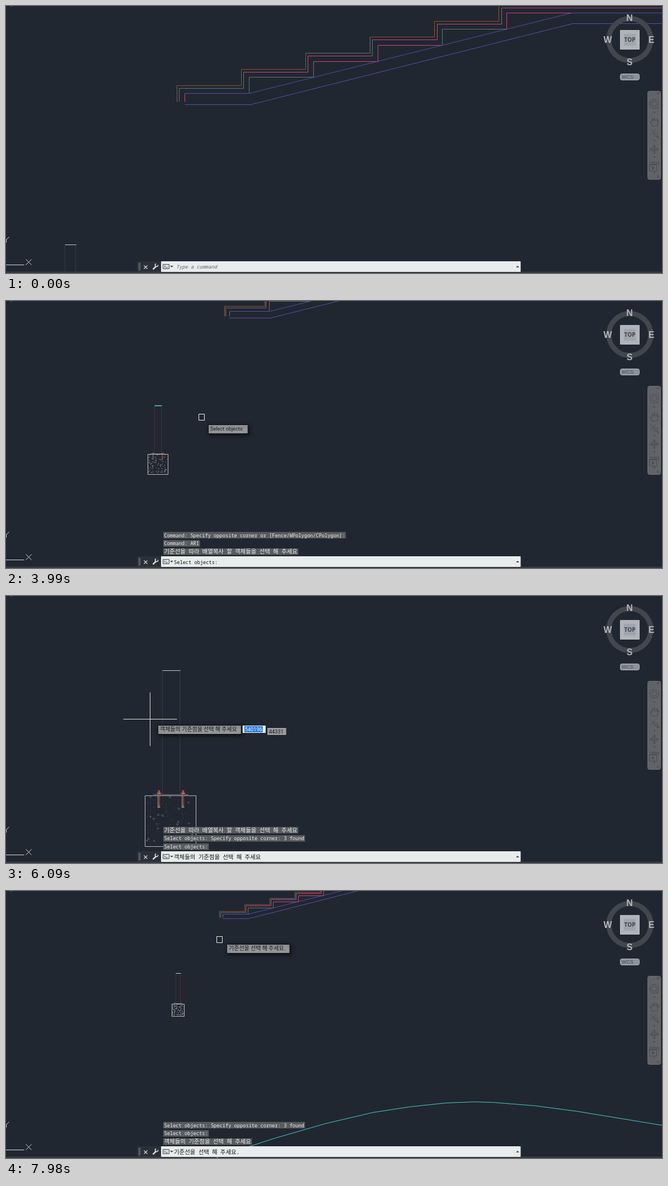
An HTML page with a canvas that plays this animation: 1172x478 px, repeating every 8 s.

```html
<!DOCTYPE html>
<html lang="en">
<head>
<meta charset="utf-8">
<title>CAD array along a line</title>
<style>
html, body { margin: 0; width: 100%; height: 100%; overflow: hidden; background: #212730; }
canvas { display: block; }
</style>
</head>
<body>
<canvas id="stage" width="1172" height="478"></canvas>
<script>
const ctx = document.getElementById('stage').getContext('2d');
const LOOP = 8000, STEP = 70, BG = '#212730';
const MONO = '8.7px "Noto Sans Mono", monospace';
const MONO_KO = '10.45px "Noto Sans Mono CJK KR", "Noto Sans CJK KR", monospace';
const UI = '9.2px Roboto, sans-serif';
const UI_KO = '10px "Noto Sans CJK KR", "Noto Sans CJK", sans-serif';

// Pointer path: time, x, y
const POINTER = [
  [420, 430, 352], [490, 430, 352], [770, 380, 397], [1120, 380, 397], [1260, 565, 145],
  [1330, 569, 139], [1400, 569, 139], [1820, 351, 188], [3920, 351, 188], [3990, 349, 208],
  [4130, 335, 328], [4270, 335, 328], [5040, 203, 235], [5110, 203, 235], [5320, 238, 238],
  [5530, 238, 238], [5600, 244, 241], [5740, 256, 222], [6370, 258, 220], [6580, 272, 177],
  [6930, 295, 133], [7280, 295, 133], [7420, 311, 152], [7560, 311, 152], [7980, 381, 87]
];
// Wheel zooms: time, factor, centre x, centre y
const IN = 1.6, OUT = 1 / 1.6;
const ZOOMS = [
  [1050, IN, 376.6, 398.5], [2030, OUT, 351, 188], [2170, OUT, 351, 188],
  [5880, IN, 256, 221.9], [6020, IN, 256, 221.9],
  [7420, OUT, 311.3, 152], [7490, OUT, 311.3, 152], [7560, OUT, 311.3, 152]
];
const PAN_START = 1120, PAN_END = 1400;

const PICK_BASE = '객체들의 기준점을 선택 해 주세요';
const PICK_LINE = '기준선을 선택 해 주세요.';
const HISTORY = [
  'Command: Specify opposite corner or [Fence/WPolygon/CPolygon]:',
  'Command: AR1',
  '기준선을 따라 배열복사 할 객체들을 선택 해 주세요',
  'Select objects: Specify opposite corner: 3 found',
  'Select objects:',
  PICK_BASE
];

const within = (t, a, b) => t >= a && t < b;
const isKorean = s => /[가-힣]/.test(s);

function pointerAt(t) {
  let i = POINTER.findIndex(k => k[0] > t);
  if (i < 0) return POINTER[POINTER.length - 1].slice(1);
  if (!i) return POINTER[0].slice(1);
  const [t0, x0, y0] = POINTER[i - 1], [t1, x1, y1] = POINTER[i];
  const p = (t - t0) / (t1 - t0);
  return [x0 + (x1 - x0) * p, y0 + (y1 - y0) * p];
}

function panAt(t) {
  if (t < PAN_START) return [0, 0];
  const [x, y] = pointerAt(Math.min(t, PAN_END)), [x0, y0] = pointerAt(PAN_START);
  return [x - x0, y - y0];
}

function viewAt(t) {
  let s = 1, x = 0, y = 0;
  ZOOMS.forEach(([when, f, cx, cy], i) => {
    if (when <= t) {
      s *= f;
      x = cx + (x - cx) * f;
      y = cy + (y - cy) * f;
    }
    if (!i) { const [dx, dy] = panAt(t); x += dx; y += dy; }
  });
  return { s, x, y };
}

function line(points, color, width = 1) {
  ctx.beginPath();
  points.forEach(([x, y]) => ctx.lineTo(Math.floor(x) + .5, Math.floor(y) + .5));
  ctx.strokeStyle = color;
  ctx.lineWidth = width;
  ctx.stroke();
}
function box(x, y, w, h, fill, stroke, r = 0) {
  ctx.beginPath();
  ctx.roundRect(x, y, w, h, r);
  if (fill) { ctx.fillStyle = fill; ctx.fill(); }
  if (stroke) { ctx.strokeStyle = stroke; ctx.lineWidth = 1; ctx.stroke(); }
}
function ring(x, y, r, color, width = 1) {
  ctx.beginPath();
  ctx.arc(x, y, r, 0, 7);
  ctx.strokeStyle = color;
  ctx.lineWidth = width;
  ctx.stroke();
}
function text(s, x, y, font, color, align = 'left') {
  ctx.font = font;
  ctx.fillStyle = color;
  ctx.textAlign = align;
  ctx.fillText(s, x, y);
}
const mono = s => isKorean(s) ? MONO_KO : MONO;

function drawStairs(P) {
  const GREY = '#5f7672', PINK = '#d13f83', BLUE = '#554fb0', RUST = '#94502c';
  const DX = 115.1, DY = 28.75;
  const flight = (x, y, steps, colors, risers) => {
    line([P(x, 171), P(x, y)], risers[0]);
    for (let i = 0; i < steps; i++) {
      const x0 = x + i * DX, y0 = y - i * DY;
      line([P(x0, y0), P(x0 + DX, y0)], colors[i]);
      line([P(x0 + DX, y0), P(x0 + DX, y0 - DY)], risers[i + 1] || risers[1]);
    }
  };
  const diagonal = '#504caa';
  line([P(434.5, 156.6), P(1010, 12.6), P(1500, 12.6)], diagonal);
  line([P(319.3, 176.3), P(437, 176.3), P(1012, 31.6), P(1500, 31.6)], BLUE);
  flight(305, 142, 5, [RUST, RUST, GREY, RUST, RUST], ['#8a5a45', RUST, RUST, GREY, RUST, RUST]);
  flight(309.6, 147, 5, [GREY, PINK, PINK, PINK, PINK], [GREY, PINK, PINK, GREY, PINK, PINK]);
  line([P(885.1, 3.3), P(1500, 3.3)], PINK);
  flight(319.3, 156.6, 5, [BLUE, GREY, PINK, PINK, GREY], [PINK, GREY, PINK, PINK, GREY, PINK]);
  line([P(894.8, 12.6), P(1010, 12.6)], PINK);
}

function drawCurve(P) {
  const points = [[360, 484], [437, 457], [480, 443], [570, 417], [655, 397], [720, 387], [785, 380],
    [835, 378], [870, 379], [945, 385], [1020, 395], [1172, 420], [1250, 433]];
  line(points.map(([x, y]) => P((x - 262.3) * 2.56, (y + 19.2) * 2.56)), '#45cfd0');
}

function drawBolt(P, s, x, red) {
  const color = red ? '#c8402f' : '#676d73';
  const part = (dx, y, w, h, fill) => {
    const [px, py] = P(x + dx, y);
    ctx.fillStyle = fill;
    ctx.fillRect(px, py, Math.max(1, w * s), Math.max(1, h * s));
  };
  part(-1.2, 561, 2.4, 3, color);
  part(-2.2, 564, 4.4, 1, '#92979b');
  part(-1.5, 566, .6, 15, '#8b9095');
  part(-.6, 565, 1.6, 15, color);
  part(-.1, 568, .5, 9, '#373d45');
  part(-1.3, 579.5, 2.6, 1, '#92979b');
}

function drawPost(P, s, t) {
  const lit = within(t, 4690, 5670);
  const [bx, by] = P(86, 567), w = 57 * s;
  const [px, py] = P(105, 427), right = P(124.5, 427)[0], foot = P(105, 567)[1];
  const cyanTop = within(t, 1050, 5670);
  const coloured = cyanTop || t >= 7490;
  let seed = 7;
  const rnd = () => (seed = seed * 16807 % 2147483647) / 2147483647;

  if (lit) {
    for (const x of [px, right]) {
      line([[x, py], [x, foot]], '#3153a8', 3);
      line([[x, py], [x, foot]], '#6079c9');
    }
    line([[px - 4, foot - 1], [right + 5, foot - 1]], '#2f77d8', 3);
  } else {
    line([[px, py], [px, foot]], coloured ? '#512840' : '#343a43');
    line([[right, py], [right, foot]], coloured && s < 1 ? '#512840' : '#343a43');
  }
  line([[px, py], [right + 1, py]], cyanTop ? '#40dce0' : '#c9cccf', s < 1 && cyanTop ? 1.5 : 1);

  // Concrete: stones and sand grains
  for (let i = 0; i < 100; i++) {
    const x = bx + (.03 + rnd() * .93) * w, y = by + (.03 + rnd() * .93) * w;
    const stone = i % 4 === 0, r = stone ? Math.max(.7, s * (.7 + rnd() * .8)) : .5;
    const a = rnd() * 6.3;
    if (lit) {
      ctx.fillStyle = '#2b72d6';
      ctx.beginPath();
      ctx.arc(x, y, 2.1, 0, 7);
      ctx.fill();
    } else if (stone) {
      ctx.beginPath();
      for (let k = 0; k < 3; k++) ctx.lineTo(x + r * Math.cos(a + k * 2.1), y + r * Math.sin(a + k * 2.1));
      ctx.closePath();
      ctx.strokeStyle = s < 1 ? '#92979b' : '#747a80';
      ctx.lineWidth = .6;
      ctx.stroke();
    } else {
      ctx.fillStyle = s < 1 ? '#7f858a' : '#4b5158';
      ctx.fillRect(Math.floor(x), Math.floor(y), 1, 1);
    }
  }
  const corner = [Math.floor(bx) + .5, Math.floor(by) + .5, Math.round(w), Math.round(w)];
  if (lit) {
    ctx.strokeStyle = '#2f7be2';
    ctx.lineWidth = 3;
    ctx.strokeRect(...corner);
  }
  box(...corner, null, lit ? '#79b3ef' : '#b9bcbf');
  if (lit) return;
  line([P(95, 565.7), P(134, 565.7)], '#767c82');
  drawBolt(P, s, 101.3, within(t, 1050, 2030) || within(t, 5880, 7490));
  drawBolt(P, s, 128.2, within(t, 2030, 7490));
}

function drawAxes(t) {
  const [dx, dy] = within(t, PAN_START, PAN_END) ? panAt(t) : [0, 0];
  const x = -5 + dx, y = 463 + dy, c = '#d8dadc';
  box(x - 2.5, y - 2.5, 6, 6, null, c);
  line([[x - 1, y - 38], [x - 1, y - 4]], c);
  line([[x + 4, y], [x + 37, y]], c);
  line([[x + 40, y - 10], [x + 50, y]], c);
  line([[x + 50, y - 10], [x + 40, y]], c);
  line([[x + 1, y - 50], [x + 5.5, y - 45], [x + 10, y - 50]], c);
  line([[x + 5.5, y - 45], [x + 5.5, y - 40]], c);
}

function drawCompass() {
  ring(1114.5, 60, 37.5, '#42474e', 9);
  const font = 'bold 16px "Liberation Sans", sans-serif';
  [['N', 1114, 27], ['S', 1114, 106], ['W', 1075, 66], ['E', 1153, 66]]
    .forEach(([s, x, y]) => text(s, x, y, font, '#b5b8bb', 'center'));
  box(1097.5, 43.5, 34, 34, '#b0b4ba', '#b9bcc1');
  box(1104, 50, 21, 21, '#a0a5ad');
  text('TOP', 1114.5, 64, 'bold 10px "Noto Sans", sans-serif', '#3b414b', 'center');
  box(1097.5, 121.5, 34, 11, '#8c929d', '#b0b4ba', 3);
  text('WCS', 1100, 130, '9px "Liberation Sans", sans-serif', '#454b55');
}

function drawNavigation() {
  const c = '#484c52';
  box(1146.5, 152.5, 23, 158, '#606469', '#6c7076', 3);
  ring(1158, 175, 8, c);
  ring(1158, 175, 4.5, c);
  line([[1161, 180], [1166, 183]], c);
  line([[1153, 213], [1150, 207], [1153, 208], [1154, 201], [1156, 206], [1158, 199], [1160, 206],
    [1163, 201], [1163, 207], [1166, 204], [1163, 214], [1154, 215], [1153, 211]], c);
  line([[1150, 220], [1162, 232]], c);
  line([[1161, 220], [1150, 231]], c);
  ring(1161, 230, 3.5, c);
  line([[1163, 233], [1166, 236]], c, 2);
  line([[1158, 248], [1158, 264]], c);
  line([[1150, 256], [1166, 256]], c);
  for (const [dx, dy] of [[0, -1], [0, 1], [1, 0], [-1, 0]]) {
    const x = 1158 + dx * 8, y = 256 + dy * 8;
    line([[x - dx * 3 + dy * 3, y - dy * 3 + dx * 3], [x, y], [x - dx * 3 - dy * 3, y - dy * 3 - dx * 3]], c);
  }
  ring(1158, 256, 4, c);
  for (const x of [1150, 1156, 1162]) box(x + .5, 279.5, 4, 4, null, c);
  box(1149.5, 284.5, 13, 11, null, c);
  ctx.fillStyle = c;
  ctx.beginPath();
  ctx.moveTo(1154, 287); ctx.lineTo(1159, 290); ctx.lineTo(1154, 293);
  ctx.fill();
  for (const y of [190, 241, 270, 298]) ctx.fillRect(1157, y - 1, 3, 2);
  ring(1165, 156, 2, c);
  ring(1165, 306, 2, c);
}

function drawCommandBar(t) {
  box(234, 457, 43, 19, '#2a3038');
  ctx.fillStyle = '#c5c8cb';
  for (let y = 460; y < 473; y += 2) { ctx.fillRect(237, y, 1, 1); ctx.fillRect(239, y, 1, 1); }
  line([[246, 464], [252, 470]], '#d5d8da', 1.3);
  line([[252, 464], [246, 470]], '#d5d8da', 1.3);
  line([[262, 471], [268, 465]], '#d5d8da', 2.5);
  ctx.beginPath();
  ctx.arc(269, 464, 2.6, -.2, 4.4);
  ctx.lineWidth = 1.6;
  ctx.stroke();

  const typing = within(t, 5600, 5670);
  box(277, 457, 642.5, 19, typing ? '#ffffff' : '#e8ecec', null, 1);
  box(280.5, 462.5, 11, 8, '#d4d8da', '#4c5157');
  line([[282, 464], [284, 466], [282, 468]], '#3c4147');
  line([[285, 468], [288, 468]], '#3c4147');
  const arrow = (x, y, dir) => {
    ctx.fillStyle = '#44494e';
    ctx.beginPath();
    ctx.moveTo(x - 3, y); ctx.lineTo(x + 3, y); ctx.lineTo(x, y + 3 * dir);
    ctx.fill();
  };
  arrow(296, 465, 1);
  arrow(914, 468, -1);

  if (t < 3570) {
    text('Type a command', 304, 469.5, 'italic ' + MONO, '#5c6064');
  } else {
    const prompt = t >= 7280 ? PICK_LINE : t >= 5670 ? PICK_BASE
      : within(t, 4270, 5110) ? 'Specify opposite corner:' : 'Select objects:';
    text(prompt, 300, 470.5, mono(prompt), '#111');
    if (typing) line([[385, 461], [385, 472]], '#111');
    const first = [5110, 5670, 7280].filter(when => when <= t).length;
    HISTORY.slice(first, first + 3).forEach((s, i) => {
      const y = 413.5 + i * 14.7;
      ctx.font = mono(s);
      box(281, y, ctx.measureText(s).width + 3, 11.5, '#585c5f');
      text(s, 282.5, y + 9, mono(s), '#f0f1f1');
    });
  }
  ctx.fillStyle = '#4a5058';
  ctx.fillRect(0, 476, 1172, 1);
}

function drawTooltip(s, x, y, extra = 0) {
  const font = isKorean(s) ? UI_KO : UI;
  ctx.font = font;
  const w = ctx.measureText(s).width + 11 + extra;
  ctx.save();
  ctx.shadowColor = 'rgba(0,0,0,.6)';
  ctx.shadowBlur = 6;
  ctx.shadowOffsetX = ctx.shadowOffsetY = 2;
  box(x + .5, y + .5, w, 16, '#97999c', '#0c0d0f');
  ctx.restore();
  text(s, x + 4, y + 10.5, font, '#15171a');
  return x + w;
}

function drawCross(x, y, pick) {
  const c = '#e6e6e3', gap = pick ? 6 : 0;
  line([[x - 48, y], [x - gap, y]], c);
  line([[x + gap, y], [x + 48, y]], c);
  line([[x, y - 48], [x, y - gap]], c);
  line([[x, y + gap], [x, y + 48]], c);
  if (pick) drawPickBox(x, y);
}
function drawPickBox(x, y) {
  box(Math.floor(x) - 4.5, Math.floor(y) - 5.5, 10, 11, null, '#f0f1f2');
}
function drawHand(x, y) {
  box(x - 5.5, y - 6, 11.5, 13, '#050607', '#f4f4f4', [5, 5, 6, 6]);
  for (const dx of [-3, 0, 3]) line([[x + dx, y - 6], [x + dx, y - 4]], '#d0d0d0');
}

function drawPointer(t) {
  if (t < 420) return;
  const [x, y] = pointerAt(t);
  if (within(t, 4270, 5110)) {
    const [x0, y0] = pointerAt(4270);
    ctx.fillStyle = 'rgba(48,120,66,.45)';
    ctx.fillRect(x, y, x0 - x, y0 - y);
    ctx.setLineDash([4, 3]);
    ctx.strokeStyle = '#d8dcd8';
    ctx.lineWidth = 1;
    ctx.strokeRect(Math.floor(x) + .5, Math.floor(y) + .5, Math.floor(x0 - x), Math.floor(y0 - y));
    ctx.setLineDash([]);
    drawTooltip('Specify opposite corner or', x + 13, y + 13, 14);
  }
  if (within(t, PAN_START, PAN_END)) return drawHand(x, y);
  if (t < 3570) {
    drawCross(x, y, true);
    if (t >= 2800) {
      const typed = t >= 3500 ? 'AR1' : t >= 3010 ? 'AR' : 'A';
      box(363, 201, 4 + typed.length * 6, 12, '#f2f3f4', '#111');
      text(typed, 365, 210.5, UI, '#111');
    }
  } else if (within(t, 5670, 7280)) {
    drawCross(x, y, false);
    const right = drawTooltip(PICK_BASE, Math.round(x) + 14, Math.round(y) + 10);
    const top = Math.round(y) + 11;
    box(right + 3, top, 41, 13, '#fff');
    box(right + 6, top + 1, 33, 11, '#2878d8');
    text(Math.round(540270 + (x - 272) * 5), right + 7, top + 9.5, UI, '#fff');
    box(right + 46.5, top + 3.5, 35, 14, '#97999c', '#0c0d0f');
    text(Math.round(44550 - (y - 177) * 5), right + 50, top + 13.5, UI, '#15171a');
    if (t >= 6930) line([[x - 3, y + 3], [x, y - 3], [x + 3, y + 3], [x - 3, y + 3]], '#35c04a');
  } else {
    drawPickBox(x, y);
    if (t >= 7280) drawTooltip(PICK_LINE, Math.round(x) + 13, Math.round(y) + 8);
    else if (!within(t, 4270, 5110)) drawTooltip('Select objects:', Math.round(x) + 12, Math.round(y) + 13);
  }
}

function draw(now) {
  const t = Math.floor((now % LOOP) / STEP) * STEP;
  const view = viewAt(t);
  const P = (x, y) => [x * view.s + view.x, y * view.s + view.y];
  ctx.fillStyle = BG;
  ctx.fillRect(0, 0, 1172, 478);
  ctx.fillStyle = '#d0d3d5';
  ctx.fillRect(9, 0, 1, 1);
  drawStairs(P);
  drawCurve(P);
  drawPost(P, view.s, t);
  drawAxes(t);
  drawCompass();
  drawNavigation();
  drawCommandBar(t);
  drawPointer(t);
}

const start = performance.now();
function tick() {
  draw(performance.now() - start);
  requestAnimationFrame(tick);
}
tick();
</script>
</body>
</html>
```
